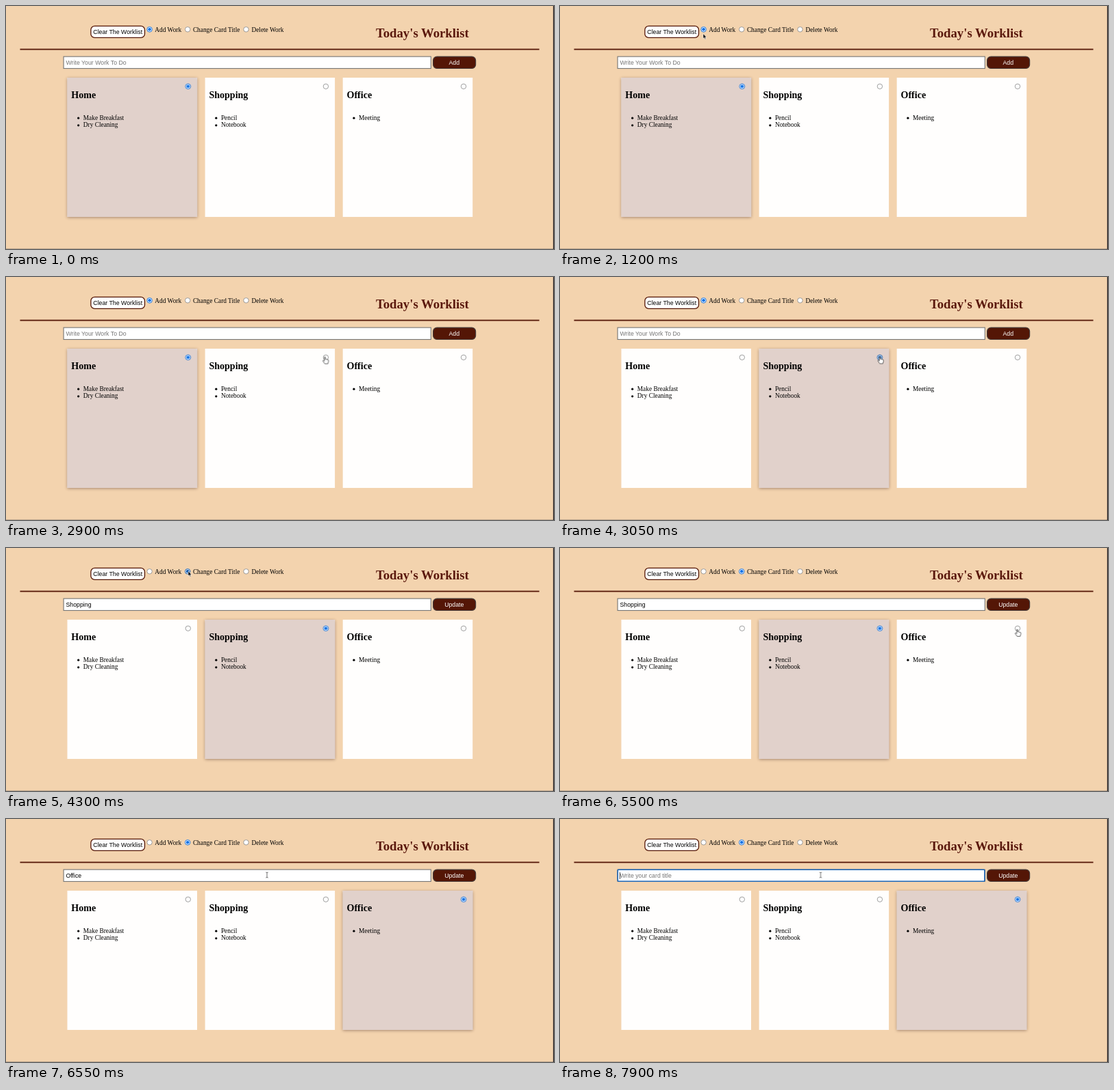
These frames come from a looping animation (800x356 px, 8 s). An HTML page:

```html
<!DOCTYPE html>
<html lang="en">
<head>
<meta charset="utf-8">
<title>Today's Worklist</title>
<style>
html, body { margin: 0; width: 100%; height: 100%; overflow: hidden; background: #f3d3ae; }
svg { display: block; width: 100%; height: 100%; }
text { font: 9.36px "Liberation Serif", "Times New Roman", serif; fill: #000; }
.h1 { font-size: 18.72px; font-weight: bold; fill: #5a180c; }
.h2 { font-size: 14.04px; font-weight: bold; }
.ui { font-family: "Liberation Sans", Arial, sans-serif; font-size: 8.78px; }
.mid { text-anchor: middle; }
.hint { fill: #757575; }
.light { fill: #fff; }
.brown { fill: #541606; }
.picked { fill: #e1d1cb; filter: drop-shadow(0 1.5px 2px rgba(70, 40, 30, .45)); }
.dot { color: #1273e6; }

/* Every part shares one 8 s clock; percent = ms / 80. */
.t { animation: 8s step-end infinite; }
.home { animation-name: home; }
.shop { animation-name: shop; }
.office { animation-name: office; }
.add { animation-name: add; }
.update { animation-name: update; }
.officeText { animation-name: officeText; }
.cleared { animation-name: cleared; }
.focus { animation-name: focus; }
.endCaret { animation-name: endCaret; }
.selection { animation-name: selection; }
.startCaret { animation-name: startCaret; }
.arrow { animation-name: arrow; }
.hand { animation-name: hand; }
.beam { animation-name: beam; }
.shopHover { animation-name: shopHover; }
.modeHover { animation-name: modeHover; }
.pointer { animation: move 8s ease-in-out infinite; }

@keyframes home { 0% { opacity: 1 } 38.125%, 100% { opacity: 0 } }
@keyframes shop { 0%, 70%, 100% { opacity: 0 } 38.125% { opacity: 1 } }
@keyframes office { 0% { opacity: 0 } 70%, 100% { opacity: 1 } }
@keyframes add { 0% { opacity: 1 } 53.75%, 100% { opacity: 0 } }
@keyframes update { 0% { opacity: 0 } 53.75%, 100% { opacity: 1 } }
@keyframes officeText { 0%, 94.375%, 100% { opacity: 0 } 70% { opacity: 1 } }
@keyframes cleared { 0% { opacity: 0 } 94.375%, 100% { opacity: 1 } }
@keyframes focus { 0% { opacity: 0 } 85.625%, 100% { opacity: 1 } }
@keyframes endCaret { 0%, 88.75%, 100% { opacity: 0 } 85.625% { opacity: 1 } }
@keyframes selection { 0%, 94.375%, 100% { opacity: 0 } 88.75% { opacity: 1 } }
@keyframes startCaret { 0% { opacity: 0 } 98.75%, 100% { opacity: 1 } }
@keyframes shopHover { 0%, 42.9%, 100% { color: #1273e6 } 38.125% { color: #0b56ac } }
@keyframes modeHover { 0%, 58.3%, 100% { color: #1273e6 } 53.75% { color: #0b56ac } }
@keyframes arrow {
  0%, 16.7%, 36%, 46%, 61.7%, 65.5%, 78.6%, 100% { opacity: 0 }
  11.875%, 17.5%, 42.9%, 47.6%, 62.75%, 74% { opacity: 1 }
}
@keyframes hand {
  0%, 42.9%, 74%, 100% { opacity: 0 }
  36%, 65.5% { opacity: 1 }
}
@keyframes beam {
  0%, 17.5%, 47.6%, 62.75% { opacity: 0 }
  16.7%, 46%, 61.7%, 78.6%, 100% { opacity: 1 }
}
@keyframes move {
  0%, 11.875% { transform: translate(225px, 14px) }
  21.875%, 24.4% { transform: translate(147px, 144px) }
  36.875%, 41.875% { transform: translate(467px, 116.5px) }
  53.125%, 57.5% { transform: translate(266px, 34px) }
  66.25%, 73.125% { transform: translate(667.5px, 119px) }
  81.875% { transform: translate(381px, 82px) }
  83.125%, 100% { transform: translate(380.5px, 82px) }
}
</style>
</head>
<body>
<svg viewBox="0 0 800 356">
  <defs>
    <circle id="radio" r="3.7" fill="#fff" stroke="#767676" stroke-width=".7"/>
    <g id="checked">
      <circle r="3.7" fill="#fff" stroke="currentColor" stroke-width=".9"/>
      <circle r="2.3" fill="currentColor"/>
    </g>
    <rect id="card" y="105" width="189.5" height="204"/>
    <circle id="bullet" r="1.6"/>
  </defs>

  <rect width="800" height="356" fill="#f3d3ae"/>
  <rect y="355" width="800" height="1" fill="#bfa98f"/>
  <rect x="798.8" width="1.2" height="356" fill="#201d22"/>

  <!-- header -->
  <rect x="123.9" y="29.4" width="78.6" height="17" rx="5.5" fill="#fff" stroke="#541606" stroke-width="1.3"/>
  <text class="ui mid" x="163.2" y="41">Clear The Worklist</text>
  <use href="#radio" x="209.6" y="34.3"/>
  <use href="#radio" x="265.2" y="34.3"/>
  <use href="#radio" x="350.5" y="34.3"/>
  <g class="t add"><use class="dot" href="#checked" x="209.6" y="34.3"/></g>
  <g class="t update"><use class="dot t modeHover" href="#checked" x="265.2" y="34.3"/></g>
  <text x="217.3" y="38">Add Work</text>
  <text x="272.9" y="38">Change Card Title</text>
  <text x="358.4" y="38">Delete Work</text>
  <text class="h1" x="540" y="45.8">Today's Worklist</text>
  <rect class="brown" x="20.5" y="62.6" width="758" height="1.8"/>

  <!-- input row -->
  <rect x="84.1" y="74.1" width="536.2" height="17.4" fill="#fff" stroke="#767676" stroke-width="1.1"/>
  <rect class="t focus" x="84.3" y="74.3" width="535.6" height="17" rx="1.2" fill="#fff" stroke="#1c66b8" stroke-width="1.6"/>
  <rect class="t selection" x="87.4" y="77.8" width="23" height="10.2" fill="#b3d7ff"/>
  <text class="ui hint t add" x="87.5" y="86">Write Your Work To Do</text>
  <g class="t update"><text class="ui t shop" x="87.5" y="86">Shopping</text></g>
  <text class="ui t officeText" x="87.5" y="86">Office</text>
  <text class="ui hint t cleared" x="87.5" y="86">Write your card title</text>
  <rect class="t endCaret" x="110.5" y="78" width=".7" height="10"/>
  <rect class="t startCaret" x="87.3" y="78" width=".7" height="10"/>
  <rect class="brown" x="623.6" y="74.1" width="62" height="17.4" rx="5.5" stroke="#463c3b" stroke-width="1.2"/>
  <text class="ui mid light t add" x="654.3" y="86">Add</text>
  <text class="ui mid light t update" x="654.3" y="86">Update</text>

  <!-- cards -->
  <g transform="translate(89.5)">
    <use href="#card" fill="#fffefd"/>
    <g class="t home"><use class="picked" href="#card"/></g>
    <use href="#radio" x="176.3" y="117.8"/>
    <g class="t home"><use class="dot" href="#checked" x="176.3" y="117.8"/></g>
    <text class="h2" x="5.8" y="135.2">Home</text>
    <use href="#bullet" x="16.2" y="164.2"/>
    <text x="23.3" y="166.8">Make Breakfast</text>
    <use href="#bullet" x="16.2" y="174.8"/>
    <text x="23.3" y="177.4">Dry Cleaning</text>
  </g>
  <g transform="translate(290.6)">
    <use href="#card" fill="#fffefd"/>
    <g class="t shop"><use class="picked" href="#card"/></g>
    <use href="#radio" x="176.3" y="117.8"/>
    <g class="t shop"><use class="dot t shopHover" href="#checked" x="176.3" y="117.8"/></g>
    <text class="h2" x="5.8" y="135.2">Shopping</text>
    <use href="#bullet" x="16.2" y="164.2"/>
    <text x="23.3" y="166.8">Pencil</text>
    <use href="#bullet" x="16.2" y="174.8"/>
    <text x="23.3" y="177.4">Notebook</text>
  </g>
  <g transform="translate(491.7)">
    <use href="#card" fill="#fffefd"/>
    <g class="t office"><use class="picked" href="#card"/></g>
    <use href="#radio" x="176.3" y="117.8"/>
    <g class="t office"><use class="dot" href="#checked" x="176.3" y="117.8"/></g>
    <text class="h2" x="5.8" y="135.2">Office</text>
    <use href="#bullet" x="16.2" y="164.2"/>
    <text x="23.3" y="166.8">Meeting</text>
  </g>

  <!-- mouse pointer -->
  <g class="pointer">
    <path class="t arrow" d="M0 0V7L1.6 5.6 2.7 8.1 3.9 7.6 2.8 5.1H5Z" stroke="#fff" stroke-width=".6"/>
    <path class="t hand" d="M-.8 .8Q0-.3 .8 .8V4Q1.7 3.2 2.3 4.1 3.2 3.6 3.8 4.5 5.1 4.1 5.2 5.4V7.4L4.3 10.4H-.2L-2.9 6.6Q-3.2 5.2-1.8 5.5L-.8 6.5Z" fill="#fff" stroke="#222" stroke-width=".7"/>
    <path class="t beam" d="M-1.7-4Q0-4 0-3V3Q0 4-1.7 4M1.7-4Q0-4 0-3M0 3Q0 4 1.7 4" fill="none" stroke="#333" stroke-width=".7"/>
  </g>
</svg>
</body>
</html>
```
